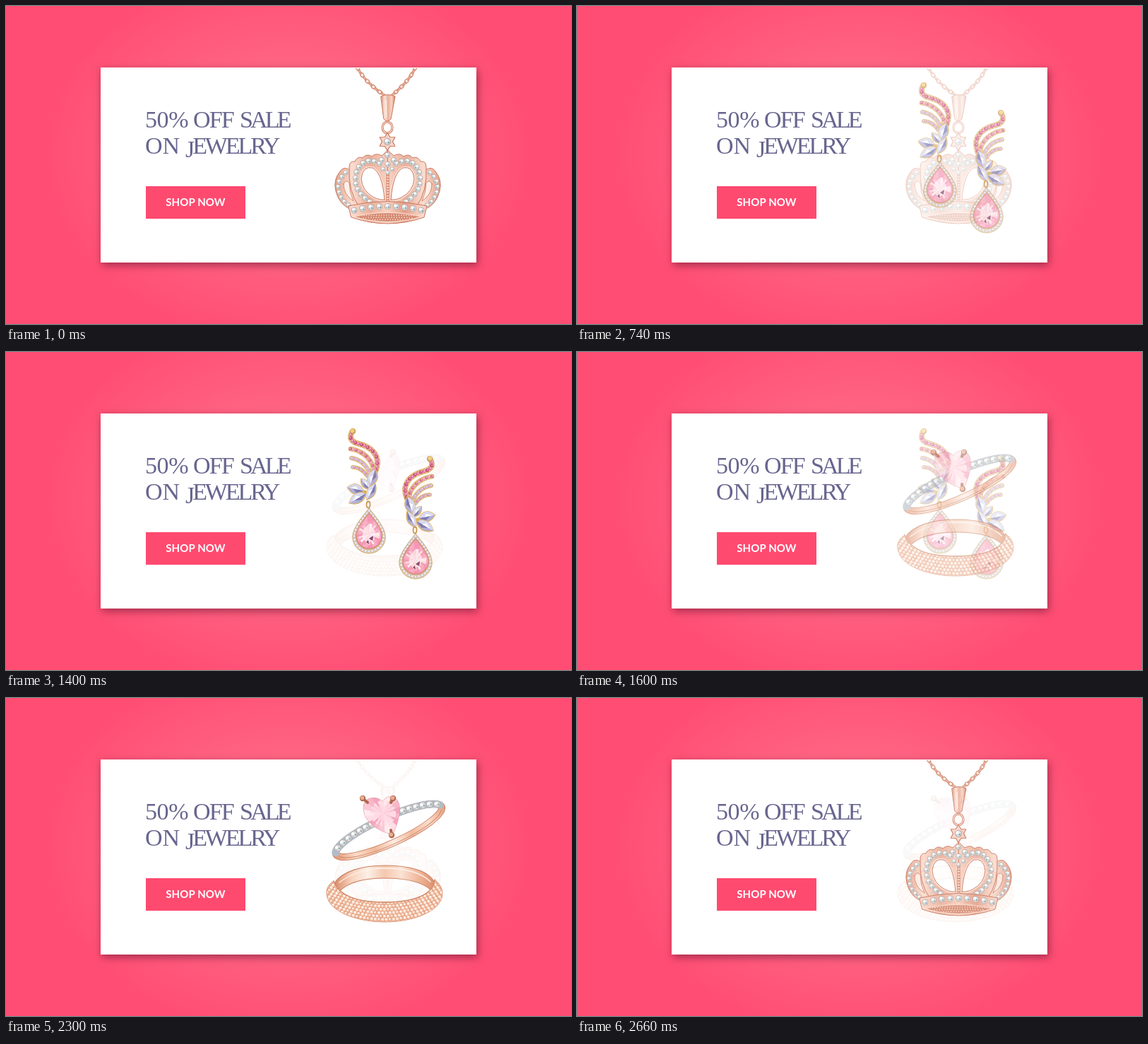
These frames come from a looping animation (800x450 px, 2.7 s). An HTML page with a canvas:

```html
<!DOCTYPE html>
<html lang="en">
<head>
<meta charset="utf-8">
<title>50% off sale on jewelry</title>
<style>
html, body { margin: 0; width: 100%; height: 100%; overflow: hidden; }
body { position: relative; background: radial-gradient(ellipse 350px 270px at 400px 210px, #ff6a87 0%, #ff6583 45%, #ff4d73 100%); }
.card { position: absolute; left: 134px; top: 87px; width: 532px; height: 276px; background: #fff; box-shadow: 2px 4px 11px rgba(90, 15, 40, .55); }
svg, canvas { position: absolute; left: 0; top: 0; width: 800px; height: 450px; }
.head { font: 34px "Liberation Serif", "Times New Roman", serif; fill: #68658f; }
.btn { font: 700 15px Lato, sans-serif; fill: #fff; letter-spacing: .1px; }
</style>
</head>
<body>
<div class="card"></div>
<svg viewBox="0 0 800 450">
  <g class="head">
    <text y="172"><tspan x="197" letter-spacing="-.4">50%</tspan><tspan x="265" letter-spacing="-1.8">OFF</tspan><tspan x="331" letter-spacing="-3.8">SALE</tspan></text>
    <text y="209"><tspan x="197">ON</tspan><tspan x="254" letter-spacing="-3.1"><tspan dy="5">J</tspan><tspan dy="-5">EWELRY</tspan></tspan></text>
  </g>
  <rect x="198" y="255" width="141" height="46" fill="#ff4a70"/>
  <text class="btn" x="268.500" y="283" text-anchor="middle">SHOP NOW</text>
</svg>
<script>
const LOOP = 2700, TAU = Math.PI * 2;
const COPPER = '#f3bda8', DARK = '#c8765c', GOLD = '#dcaa4a';
let c;

function layer(draw) {
  const el = document.createElement('canvas');
  el.width = 800;
  el.height = 450;
  document.body.append(el);
  c = el.getContext('2d');
  c.lineCap = c.lineJoin = 'round';
  c.beginPath();
  c.rect(448, 88, 184, 244);
  c.clip();
  draw();
  return el;
}

function shape(d, fill, line, w = 1) {
  const p = new Path2D(d);
  if (fill) { c.fillStyle = fill; c.fill(p); }
  if (line) { c.strokeStyle = line; c.lineWidth = w; c.stroke(p); }
}

function disc(x, y, r, fill) {
  c.fillStyle = fill;
  c.beginPath();
  c.arc(x, y, r, 0, TAU);
  c.fill();
}

function ring(x, y, rx, ry, rot, color, w, a = 0, b = TAU) {
  c.strokeStyle = color;
  c.lineWidth = w;
  c.beginPath();
  c.ellipse(x, y, rx, ry, rot, a, b);
  c.stroke();
}

function shade(x0, y0, x1, y1, colors) {
  const g = c.createLinearGradient(x0, y0, x1, y1);
  colors.forEach((k, i) => g.addColorStop(i / (colors.length - 1), k));
  return g;
}

// Calls put(x, y, angle, index) at even distances on a path
function along(d, step, put) {
  const p = document.createElementNS('http://www.w3.org/2000/svg', 'path');
  p.setAttribute('d', d);
  const len = p.getTotalLength(), n = Math.round(len / step);
  for (let i = 0; i <= n; i++) {
    const s = len * i / n, q = p.getPointAtLength(s);
    const a = p.getPointAtLength(Math.max(0, s - .5)), b = p.getPointAtLength(Math.min(len, s + .5));
    put(q.x, q.y, Math.atan2(b.y - a.y, b.x - a.x), i);
  }
}

function at(x, y, rot, sx, sy, draw) {
  c.save();
  c.translate(x, y);
  c.rotate(rot);
  c.scale(sx, sy);
  draw();
  c.restore();
}

function gem(x, y, r) {
  disc(x, y, r, '#b7a29c');
  disc(x, y, r * .83, '#d5dfe1');
  disc(x - r * .25, y - r * .3, r * .42, '#fff');
  disc(x + r * .35, y + r * .25, r * .27, '#8fa4aa');
  disc(x - r * .4, y + r * .35, r * .18, '#a9b4b8');
}

// Fan of cut faces clipped to an outline
function facets(d, x, y, R, n, colors) {
  c.save();
  c.clip(new Path2D(d));
  const pt = (i, r) => [x + r * Math.cos(i / n * TAU), y + r * Math.sin(i / n * TAU)];
  const tri = (k, ...pts) => {
    c.fillStyle = k;
    c.beginPath();
    pts.forEach(q => c.lineTo(...q));
    c.fill();
  };
  for (let i = 0; i < n; i++) {
    tri(colors[i * 3 % colors.length], [x, y], pt(i, R), pt(i + 1.04, R));
    tri(colors[(i * 5 + 1) % colors.length], [x, y], pt(i + .5, R * .48), pt(i + 1.5, R * .48));
  }
  c.restore();
}

function necklace() {
  const metal = shade(465, 0, 615, 0, ['#e5a18a', '#fbdccf', '#eab09b', '#f9d3c4', '#e39c85', '#fbdccf', '#e5a18a']);
  const link = (x, y, a, i) => {
    ring(x, y, 3.7, i % 2 ? 1 : 2.2, a, DARK, 1.4);
    ring(x, y, 3.4, i % 2 ? .7 : 1.9, a, COPPER, .8);
  };
  along('M498 88Q508 107 534 125', 5.7, link);
  along('M579 88Q572 105 548 125', 5.7, link);

  ring(540, 172, 7, 8, 0, DARK, 3.2);
  ring(540, 172, 7, 8, 0, '#f6cbbb', 1.7);
  shape('M531 128Q540 123 551 128L545 160Q540 166 535 160Z', shade(531, 0, 551, 0, ['#d58f78', '#fce2d7', '#ebb19c', '#f9d5c6', '#cb8168']), DARK);
  shape('M538 134L538.500 157', null, '#fff0e8', 1.5);

  const side = () => {
    shape('M487 232Q478 226 473 234Q463 246 467 262Q472 282 489 288L500 280Q486 262 487 232Z', metal, DARK);
    shape('M478 252Q478 267 492 276Q486 263 486 250Q481 245 478 252Z', '#fdf0ea', DARK, .8);
    along('M481 236Q468 247 471 261Q474 274 485 282', 8, (x, y) => gem(x, y, 3.5));
  };
  const front = () => {
    shape('M540.500 204L532 212Q524 207 518 213Q511 208 505 215Q498 212 494 220Q486 219 486 228Q484 262 500 284L540.500 282Z', metal, DARK);
    const hole = 'M536 274Q533 236 519 229Q505 226 503 244Q504 262 521 271Q530 275 536 274Z';
    shape(hole, '#fff', '#fbe3d9', 3.6);
    shape(hole, '#fff', DARK, 1);
    along('M529 223Q513 214 501 226Q491 240 497 257Q502 269 515 277', 8.6, (x, y) => gem(x, y, 4));
  };
  for (const part of [side, front]) {
    part();
    at(1081, 0, 0, -1, 1, part);
  }
  shape('M540.500 236L540.500 276', null, DARK, 4);
  along('M540.500 238L540.500 276', 4, (x, y) => disc(x, y, 1.5, '#fad6c8'));
  [[540, 211, 4], [532, 218, 4], [549, 218, 4], [540.5, 224, 4.2], [534, 231, 3.3], [547, 231, 3.3], [540.5, 236, 3]].forEach(g => gem(...g));

  let star = '';
  for (let i = 0; i < 12; i++) {
    const r = i % 2 ? 7.5 : 12.5, a = i / 12 * TAU - TAU / 4;
    star += (i ? 'L' : 'M') + (540 + r * Math.cos(a)) + ' ' + (192 + r * Math.sin(a));
  }
  shape(star + 'Z', '#f9d5c7', DARK, 1.2);
  gem(540, 192, 5.2);

  shape('M485 283Q540 270 596 283L592 299Q540 317 489 299Z', metal, DARK);
  along('M493 289Q540 278 588 289', 11.8, (x, y) => gem(x, y, 4.6));
  shape('M492 298Q540 287 589 298Q540 313 492 298Z', '#cf846c', '#fbdacc', 1.4);
  for (const y of [297, 300, 303])
    along(`M${500 + (y - 297) * 2} ${y}Q540 ${y - 2} ${581 - (y - 297) * 2} ${y}`, 3.6, (x, y) => disc(x, y, 1.1, '#f6c7b4'));
}

function leaf(x, y, deg, l, w) {
  at(x, y, deg * TAU / 360, 1, 1, () => {
    shape(`M${-l} 0Q0 ${-w * 2} ${l} 0Q0 ${w * 2} ${-l} 0Z`, '#aba8d6', GOLD, 1.2);
    shape(`M${-l} 0Q0 ${-w * 2} ${l} 0Z`, '#d6d7f0');
    shape(`M${-l * .4} 0L${l * .2} ${w * .7}L${l} 0Z`, '#716ea8');
    shape(`M${-l * .6} 0L0 ${-w * .6}L${l * .3} 0Z`, '#fff');
  });
}

function wing() {
  const row = (d, w, colors) => {
    shape(d, null, '#c08a3a', w + 1);
    shape(d, null, '#ecc878', w);
    along(d, w * .72, (x, y, a, i) => {
      disc(x, y, w * .4, colors[i % colors.length]);
      disc(x - .6, y - .6, w * .11, '#fff');
    });
  };
  row('M491 163Q503 163 511 175', 4.4, ['#bda8da', '#d97fa4']);
  row('M489 150Q507 153 515 171', 5, ['#c6b0de', '#c893c0']);
  row('M488 137Q509 141 518 158Q521 165 519 173', 5.6, ['#d0547f', '#e58fa9']);
  row('M490 113Q483 126 500 130Q523 136 526 154Q526 164 522 171', 6.6, ['#c43f70', '#dd6c92']);
  disc(491, 112, 4, '#c08a3a');
  disc(490.5, 111.5, 3, '#f0c96c');
  [[519, 178, -72, 13, 7], [509, 187, 50, 10, 5], [495, 194, 12, 12, 7], [498, 207, -30, 14, 7], [517, 198, -62, 13, 6]].forEach(l => leaf(...l));
  disc(508, 198, 2.6, GOLD);
}

function drop(x, y) {
  ring(x - 1, y - 38, 2.5, 4.5, 0, '#c08a3a', 1.8);
  at(x, y, 0, 1, 1, () => {
    const tear = k => `M0 ${-34 * k}C${8 * k} ${-24 * k} ${24 * k} ${-6 * k} ${24 * k} ${8 * k}A${24 * k} ${24 * k} 0 0 1 ${-24 * k} ${8 * k}C${-24 * k} ${-6 * k} ${-8 * k} ${-24 * k} 0 ${-34 * k}Z`;
    shape(tear(.97), '#e3cda0', '#bd9455', .8);
    along(tear(.87), 4.7, (x, y) => {
      disc(x, y, 2, '#a79db0');
      disc(x, y, 1.6, '#eeebf5');
    });
    shape(tear(.77), '#f27ca2', '#c58a52', 1.2);
    facets(tear(.72), 0, 4, 32, 15, ['#f9a3be', '#ffdbe5', '#fff6f8', '#f48dae', '#fdc2d3', '#ffe8ee']);
    shape('M-8 -3L1 -12L9 0L7 12L-3 17L-10 8Z', 'rgba(255,244,247,.7)');
    shape('M0 10L6 6L5 13ZM-4 15L-1 12L0 18Z', '#6d3050');
  });
}

function earrings() {
  wing();
  drop(514, 254);
  at(1091, 39, 0, -1, 1, wing);
  drop(580, 290);
}

function rings() {
  const metal = shade(-85, 0, 85, 0, ['#e08b64', '#fcd9c4', '#efb192', '#fdebdf', '#f0b495', '#fcdcc9', '#e39671']);
  at(542, 187.5, -.422, 1, 1, () => {
    ring(0, 0, 82, 18.5, 0, '#c06b48', 10);
    ring(0, 0, 82, 18.5, 0, metal, 8.4);
    ring(0, 1.5, 80, 19, 0, '#cd8060', 1, .15, 3);
    ring(0, 0, 82, 18.5, 0, '#a9b6c1', 11, 3.25, 6.1);
    for (let x = -76; x < 78; x += 9.6) gem(x, -18.5 * Math.sqrt(1 - (x / 82) ** 2), 5);
  });

  const heart = 'M547 193Q521 187 509 168Q502 150 513 143Q526 139 533 147Q540 137 550 141Q559 148 557 163Q554 181 547 193Z';
  shape(heart, '#f9bccb', '#dc8ba2', 1.1);
  facets(heart, 534, 163, 38, 17, ['#f8b0c4', '#ffdbe3', '#fac4d1', '#f29cb5', '#ffe9ee']);
  shape('M520 152L532 154L546 149L550 162L541 177L521 168Z', 'rgba(255,212,223,.6)');
  for (const [d, x, y] of [['M505 142L512 148', 505, 142], ['M548 142L545 148', 548, 142], ['M546 194L545 187', 546, 194]]) {
    shape(d, null, '#a85a3c', 4);
    disc(x, y, 4.2, '#a85a3c');
    disc(x - .6, y - .8, 2.8, '#e8a582');
  }

  shape('M465 262C476 245 505 237 536 237C570 237 598 244 606 260L606 277C596 262 570 255 536 255C505 255 482 262 471 275Z',
    shade(465, 0, 607, 0, ['#d57f59', '#f8cdb5', '#fdeee4', '#f4c3a8', '#fbe0d0', '#efb192', '#d8865f']), '#c27350', 1.1);
  shape('M472 261C490 247 515 241 536 241C566 241 588 247 601 260', null, '#fdf0e8', 1.3);

  const band = 'M464 259Q452 266 454 279C458 304 500 317 536 317C574 317 614 304 618 279Q619 266 607 257C606 272 590 289 536 289C490 289 470 276 464 259Z';
  shape(band, '#e29a77');
  c.save();
  c.clip(new Path2D(band));
  for (let j = -3; j < 9; j++)
    for (let i = -17; i < 18; i++) {
      const x = 536 + (i + (j & 1) / 2) * 5.2, y = 290 + j * 4.7 - ((x - 536) / 82) ** 2 * 20;
      disc(x, y, 2.3, (i + j) % 3 ? '#fad5bf' : '#f0b698');
      disc(x - .5, y - .6, 1.2, '#fff8f3');
    }
  c.restore();
  shape(band, null, '#dd9a7a', 1);
  shape('M464 259C470 276 490 289 536 289C590 289 606 272 607 257', null, '#cc7e5c', 1.4);
}

// Rows: time, opacity, easing until the next row
function play(el, rows) {
  const frames = rows.map(([t, opacity, easing = 'step-end']) =>
    ({ offset: t === 0 || t === LOOP ? t / LOOP : (t - 1) / LOOP, opacity, easing }));
  el.animate(frames, { duration: LOOP, iterations: Infinity });
}

const FADE = 'steps(11, start)', LAST = 'steps(10, start)';
play(layer(necklace), [[0, 1], [500, 1, FADE], [940, 0], [2300, 0, LAST], [LOOP, 10 / 11]]);
play(layer(earrings), [[0, 0], [500, 0, FADE], [940, 1], [1400, 1, FADE], [1840, 0], [LOOP, 0]]);
play(layer(rings), [[0, 0], [1400, 0, FADE], [1840, 1], [2300, 1, LAST], [LOOP, 1 / 11]]);
</script>
</body>
</html>
```
